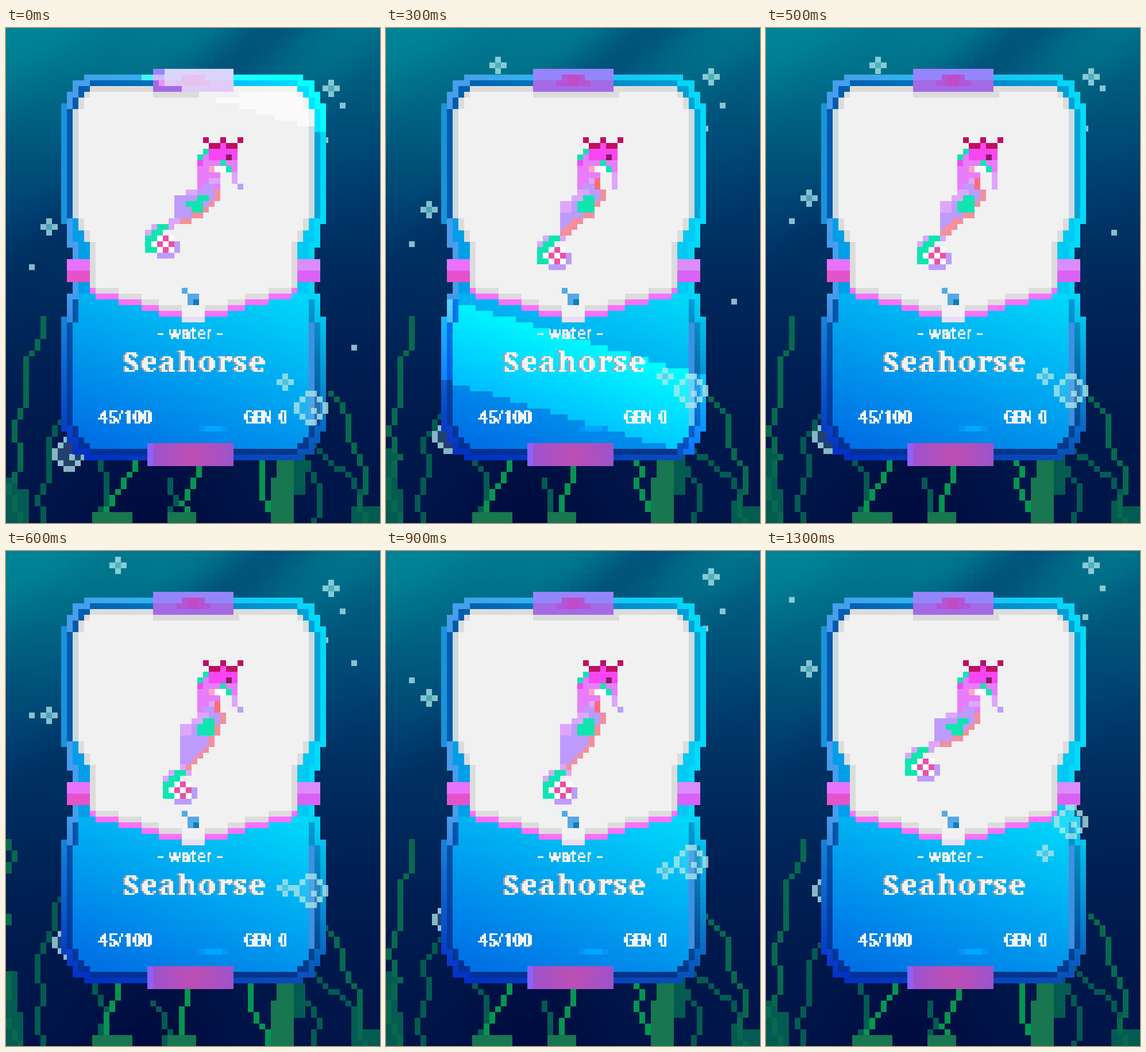
These frames come from a looping animation (651x861 px, 1.5 s). An HTML page with a canvas:

```html
<!DOCTYPE html>
<html lang="en">
<head>
<meta charset="utf-8">
<title>Seahorse card</title>
<style>
html, body { margin: 0; width: 100%; height: 100%; overflow: hidden; background: #00285c; }
canvas { display: block; width: 651px; height: 861px; }
</style>
</head>
<body>
<canvas id="stage" width="651" height="861" role="img" aria-label="- water - Seahorse 45/100 GEN 0"></canvas>
<script>
const W = 651, H = 861, U = 10.02, LOOP = 1500, TICK = 100;
const g = document.getElementById('stage').getContext('2d');
const clamp = (v, lo = 0, hi = 1) => Math.max(lo, Math.min(hi, v));
const mix = (a, b, t) => a.map((v, i) => v + (b[i] - v) * clamp(t));
const rgb = a => `rgb(${a.map(Math.round)})`;
const bump = (v, mid, width) => Math.exp(-(((v - mid) / width) ** 2));

function layer(w = W, h = H) {
  const c = document.createElement('canvas');
  c.width = w; c.height = h;
  return c.getContext('2d', { willReadFrequently: true });
}

// a painter of whole cells on a grid that starts at ox, oy
function grid(k, ox = 0, oy = 0) {
  return (color, c, r, w = 1, h = 1) => {
    const x = Math.round(ox + c * U), y = Math.round(oy + r * U);
    k.fillStyle = color;
    k.fillRect(x, y, Math.round(ox + (c + w) * U) - x, Math.round(oy + (r + h) * U) - y);
  };
}
const CARD = [5.6, .8];
const sea = grid(g), horse = grid(g, 2), shine = grid(g, ...CARD);

// ---------- water ----------
function paintWater() {
  const k = layer(), put = grid(k);
  for (let r = 0; r < 86; r++) for (let c = 0; c < 65; c++) {
    const x = c * U, y = r * U, u = x + y;
    let v = 27 - y * .01 + (105 - 30 * x / W) * Math.exp(-((y / 330) ** 1.4));
    v += clamp(1 - y / 480) * (10 * bump(u, 630, 70) - 24 * bump(u, 450, 75) + 3 * Math.sin(u / 40));
    v -= 9 * bump(x, 250, 130) * clamp((y - 550) / 250);
    put(rgb([0, v, 52 + v * .98 - Math.max(0, v - 60) * .45]), c, r);
  }
  return k.canvas;
}

// ---------- card ----------
const TOP = 8, BOTTOM = 74;
const side = c => Math.min(c, 63 - c);
const round = (d, steps) => steps[d] || 0;
const CORNER = [4, 2, 2, 1, 1], INNER = [3, 2, 1, 1];

function onCard(c, r) {
  if (r < TOP || r > BOTTOM) return false;
  const waist = 2 - Math.floor(Math.abs(r - 41.5) / 4);
  return side(c) >= 9 + Math.max(waist, round(r - TOP, CORNER), round(BOTTOM - r, CORNER));
}
const NEAR = [[1, 0], [-1, 0], [0, 1], [0, -1]];
const DIAGONAL = [[1, 1], [1, -1], [-1, 1], [-1, -1]];
const deep = (c, r) => [...NEAR, ...DIAGONAL].every(([x, y]) => onCard(c + x, r + y));
const inner = (c, r) => NEAR.every(([x, y]) => deep(c + x, r + y));

const rim = m => Math.floor(45.75 + .28 * Math.max(0, m - 14));
const panelEdge = r => 11 + Math.max(round(r - 10, INNER), clamp(Math.floor((r - 31) / 2), 0, 3));
const onPanel = (c, r) => r > 9 && side(c) >= panelEdge(r) && r < rim(side(c));
const onRim = (c, r) => side(c) > 13 && r === rim(side(c));

function cardColor(c, r) {
  const m = side(c), t = (c - 9) / 45, low = (r - 45) / 29;
  if (onRim(c, r)) return m > 29 ? '#e8dff6' : '#fb70fb';
  if (onPanel(c, r)) {
    if (m === panelEdge(r)) return r > 13 && r < 33 ? '#cbdae0' : '#dcdcdc';
    return r === 10 || (r === rim(m) - 1 && m < 30) ? '#dcdcdc' : '#f1f1f1';
  }
  if (!deep(c, r)) {
    const high = m === 9 ? [24, 148, 220] : [74, 155, 235];
    return rgb(mix(mix(high, [0, 218, 248], t), mix([0, 45, 195], [10, 80, 185], t), low));
  }
  if (!inner(c, r) && (r < 33 || r > 46)) {
    return rgb(mix(mix([0, 88, 172], [0, 165, 218], t), mix([0, 48, 150], [5, 50, 130], t), low));
  }
  if (r < 46) return rgb(mix([0, 155, 232], [0, 205, 245], t));
  if (c === 52) return '#3f90e0';
  return rgb(mix([0, 218, 250], [0, 105, 228], ((52 - c) * .5 + (r - 46) * 1.3) / 55));
}

function paintCard() {
  const k = layer(), put = grid(k, ...CARD);
  for (let r = TOP; r <= BOTTOM; r++) for (let c = 9; c < 55; c++) {
    if (onCard(c, r)) put(cardColor(c, r), c, r);
  }
  // clasps
  put('#dcdcdc', 25, 11, 15);
  put('#9585fb', 25, 7, 14, 2);
  put('#a46ae6', 25, 9, 14, 2);
  put('#b256d6', 29, 9, 6);
  put('#b256d6', 30, 8, 4);
  put('#bf4cc6', 31, 8, 2, 2);
  put('#e872fb', 10, 40, 4, 2);
  put('#e552cc', 10, 42, 4, 2);
  put('#dc8cfa', 50, 40, 4, 2);
  put('#d962f4', 50, 42, 4, 2);
  for (let c = 24; c < 39; c++) for (let r = 72; r < 76; r++) {
    put(rgb(mix([192, 78, 178], [152, 84, 208], Math.hypot(c - 31.5, r - 73.5) / 8)), c, r);
  }
  put('#8b62fa', 24, 72, 1, 4);
  // drop and glint
  put('#52a9e6', 30, 45);
  put('#52a9e6', 31, 46, 2, 2);
  put('#137bb9', 32, 47);
  put('#0894f4', 33, 69, 5);
  put('#00a6ff', 34, 69, 3);
  return k.canvas;
}

// ---------- lettering, set on a finer grid ----------
function paintText() {
  const P = U / 3, w = 195, h = 258, k = layer(w, h), out = layer();
  function line(text, font, size, x, y, color, gap = 0, space = 0) {
    const t = layer(w, h);
    t.font = `700 ${size / P}px ${font}`;
    t.letterSpacing = gap / P + 'px';
    t.wordSpacing = space / P + 'px';
    t.fillText(text, Math.round(x / P), Math.round(y / P));
    const img = t.getImageData(0, 0, w, h), d = img.data;
    for (let i = 3; i < d.length; i += 4) d[i] = d[i] > 110 ? 255 : 0;
    t.putImageData(img, 0, 0);
    t.globalCompositeOperation = 'source-in';
    t.fillStyle = color;
    t.fillRect(0, 0, w, h);
    k.drawImage(t.canvas, 0, 0);
  }
  const sans = 'Roboto, sans-serif', serif = '"Noto Serif", serif', white = '#f2f4f6';
  line('- water -', sans, 29.5, 263, 540, white, .4);
  line('Seahorse', serif, 50, 200.4, 598, '#a3a5ae', 2.5);
  line('Seahorse', serif, 50, 203.7, 598, '#f2f2f2', 2.5);
  line('45/100', sans, 30, 159, 688, white, -.6);
  line('GEN 0', sans, 28, 415, 688, white, -2.2, 7);
  out.imageSmoothingEnabled = false;
  out.drawImage(k.canvas, 0, 0, w * P, h * P);
  return out.canvas;
}

// ---------- seahorse: a fixed head, a body that stretches, a curled tail ----------
const LILAC = '#dda6fb', PURPLE = '#bd9bfd', PINK = '#e97cfc', MAGENTA = '#f846f2',
  MINT = '#0fe5b0', SALMON = '#f48f9b', CRIMSON = '#bf0f60', HOT = '#ee4fa6', WHITE = '#ffffff';

function drawHead(pose) {
  for (const c of [34, 37, 40]) horse(CRIMSON, c, 19);
  horse(CRIMSON, 35, 20, 5);
  horse(MAGENTA, 37, 20);
  horse(MAGENTA, 35, 21, 5, 2);
  horse('#8c1d62', 38, 22);
  horse(PINK, 34, 22, 6, 0);
  horse(PINK, 34, 22);
  horse(PINK, 33, 23, 7);
  horse(MAGENTA, 33, 23);
  horse(PINK, 33, 24, 4, 4);
  horse('#ffa5c0', 35, 24);
  horse(WHITE, 36, 24, 2);
  horse(PINK, 39, 24);
  horse(LILAC, 39, 25, 1, pose === 1 ? 3 : 2);
  if (pose !== 1) horse(PURPLE, 40, 27);
  horse(LILAC, 35, 26, 2);
  horse(PURPLE, 34, 27, 2);
  if (pose) horse('#ff6b7c', 36, 26, 1, 2);
  for (const [c, r] of [[34, 21], [33, 22], [37, 23], [38, 24]]) horse(MINT, c, r);
}

function drawBody(pose) {
  const long = Math.min(pose, 1), rows = 6 + 2 * pose;
  for (let i = 0; i < rows; i++) {
    const r = 28 + i, last = i === rows - 1;
    const left = last ? 28 + 2 * long : Math.round(Math.max(29 + long, 31 + 2 * long - (2 - long / 2) * i));
    const right = Math.round(36 + long - (5 + long) * (i / (rows - 1)) ** 1.6);
    horse(PURPLE, left, r, right - left + 1);
    if (i < 1 + 3 * long || last) horse(LILAC, left, r, 2);
    const belly = i > 3 && pose < 2 ? 2 : 1;
    horse(SALMON, right + 1 - belly, r, belly);
  }
  horse(MINT, 33 + long, 29, 2);
  horse(MINT, 31 + 2 * long, 30, 3);
  horse(MINT, 32 + long, 31, 2 + long);
}

function drawTail(pose) {
  const x = 24 + Math.round(1.5 * pose), y = 34 + 2 * pose;
  const put = (color, c, r, w, h) => horse(color, x + c, y + r, w, h);
  put(LILAC, 1, 0, 4);
  put(MINT, 2, 0, 2);
  put(LILAC, 0, 1);
  put(MINT, 1, 1, 2);
  put(MINT, 0, 2, 2, 3);
  put(WHITE, 1, 3);
  for (let r = 2; r < 5; r++) for (let c = 2; c < 5; c++) put((c + r) % 2 ? HOT : WHITE, c, r);
  put(PURPLE, 5, 3, 1, 2);
  put(PURPLE, 2, 5, 3);
}

// ---------- seaweed: stems that lean more towards the tip ----------
const DIM = '#035b52', MID = '#07694f', LIT = '#049650', BASE = '#187650';
const STEMS = [
  { color: DIM, foot: 17, top: 74, bend: -1, sway: .3 },
  { color: DIM, foot: 28, top: 78, bend: 0, sway: .6 },
  { color: DIM, foot: 61, top: 72, bend: -8, sway: .3 },
  { color: DIM, foot: 54, top: 74, bend: -2, sway: .5 },
  { color: DIM, foot: 6, top: 59, bend: 8, sway: 1 },
  { color: MID, foot: 1, top: 50, bend: 5, sway: 1.4 },
  { color: MID, foot: 62, top: 63, bend: -6, sway: .6 },
  { color: LIT, foot: 18, top: 74, bend: 5, sway: .8 },
  { color: LIT, foot: 31, top: 74, bend: 2, sway: .6 },
  { color: LIT, foot: 45, top: 74, bend: -2, sway: .6 }
];

function drawStem({ color, foot, top, bend, sway }, push) {
  let prev = null;
  for (let r = top; r < 86; r++) {
    const h = (86 - r) / (86 - top);
    const x = Math.round(foot + bend * h ** 2.6 - sway * push * h + .7 * Math.sin(r * .6 + foot));
    const from = prev === null || Math.abs(x - prev) < 2 ? x : Math.min(x, prev + 1);
    sea(color, from, r, Math.max(1, x - from + 1));
    prev = x;
  }
}

function drawWeeds(beat) {
  const push = (2 - Math.abs(beat - 2)) ** 2;
  sea(DIM, 0, 80, push ? 3 : 4, 6);
  sea(DIM, 0, push ? 73 : 78, 2, 7);
  sea(DIM, 61, 83, 4, 3);
  sea(DIM, 49, 75, 3, 6);
  for (const stem of STEMS) drawStem(stem, push);
  sea(BASE, 15, 84, 7, 2);
  sea(BASE, 28, 84, 5, 2);
  sea(BASE, 46, 78, 4, 8);
  sea(BASE, 47, 75, 3, 3);
}

// ---------- bubbles and sparkles ----------
const PALE = 'rgba(178,232,234,.76)', SOFT = 'rgba(110,205,215,.7)';
const dot = (c, r) => sea(PALE, c, r);
function star(c, r) {
  for (const [x, y] of NEAR) dot(c + x, r + y);
  sea(SOFT, c, r);
}
function bubble(c, r) {
  sea('rgba(170,230,245,.2)', c + 1, r + 1, 4, 4);
  for (const y of [0, 5]) sea(PALE, c + 2, r + y, 2);
  for (const x of [0, 5]) sea(PALE, c + x, r + 2, 1, 2);
  for (const x of [1, 4]) for (const y of [1, 4]) dot(c + x, r + y);
  dot(c + 3, r + 3);
}

// each rises once per `every` ticks, by speed and a growing gain
const BEHIND = [
  { draw: star, c: 7, row: 34, every: 1, speed: 1.04, gain: 0 },
  { draw: dot, c: 4, row: 41, every: 2, speed: 3.3, gain: .36 },
  { draw: dot, c: 60, row: 55, every: 2, speed: 6, gain: 2 },
  { draw: star, c: 56, row: 10, every: 3, speed: 2, gain: 0 },
  { draw: dot, c: 55, row: 19, every: 3, speed: 2, gain: 0 },
  { draw: dot, c: 58, row: 13, every: 5, speed: 2.5, gain: .5 },
  { draw: star, c: 19, row: 10, every: 3, speed: 4, gain: 0 },
  { draw: bubble, c: 8, row: 71, every: 3, speed: 2.55, gain: .3 }
];
const FRONT = [
  { draw: star, c: 48, row: 61, every: 3, speed: 1.1, gain: .3 },
  { draw: bubble, c: 50, row: 63, every: 3, speed: 2.1, gain: .66 }
];
function rise(list, step) {
  for (const { draw, c, row, every, speed, gain } of list) {
    const n = Math.floor(step / every);
    draw(c, row - Math.round(speed * n + gain * n * n));
  }
}

// ---------- glare sweeping down the card ----------
function drawGlare(step) {
  if (step > 4) return;
  const leaving = step === 4;
  for (let r = 7; r < 77; r++) for (let c = 9; c < 55; c++) {
    const x = CARD[0] + (c + .5) * U, y = (r + .5) * U;
    const end = 112 + 165 * step + 8 * step * step + .3 * (x - 326);
    if (y > end || y < end - 142) continue;
    if (leaving) {
      const floor = 738 + .12 * (x - 96);
      if (x < 376 && y < floor) shine('#fdfefe', c, r);
      else if (x < 376 && x > 126 && y < floor + 13) shine('#00ff80', c, r);
      continue;
    }
    const clasp = r < 11 && c > 26 && c < 39;
    if (!onCard(c, r) && !clasp) continue;
    const pale = clasp || onPanel(c, r) || onRim(c, r) || (side(c) < 14 && r > 39 && r < 44);
    g.globalCompositeOperation = pale ? 'source-over' : 'color-dodge';
    shine(pale ? 'rgba(255,255,255,.66)' : '#484848', c, r);
  }
  g.globalCompositeOperation = 'source-over';
}

// ---------- loop ----------
const water = paintWater(), card = paintCard(), text = paintText();

function render(step) {
  const pose = Math.max(0, 2 - Math.floor(Math.abs(step - 7.5) / 2.5));
  g.drawImage(water, 0, 0);
  drawWeeds(Math.floor(step / 3));
  rise(BEHIND, step);
  g.drawImage(card, 0, 0);
  drawHead(pose);
  drawBody(pose);
  drawTail(pose);
  drawGlare(step);
  g.drawImage(text, 0, 0);
  rise(FRONT, step);
}

const start = performance.now();
let shown = -1;
function frame() {
  // the last pose holds for two ticks
  const step = Math.min(13, Math.floor((performance.now() - start) % LOOP / TICK));
  if (step !== shown) render(shown = step);
  requestAnimationFrame(frame);
}
frame();
</script>
</body>
</html>
```
